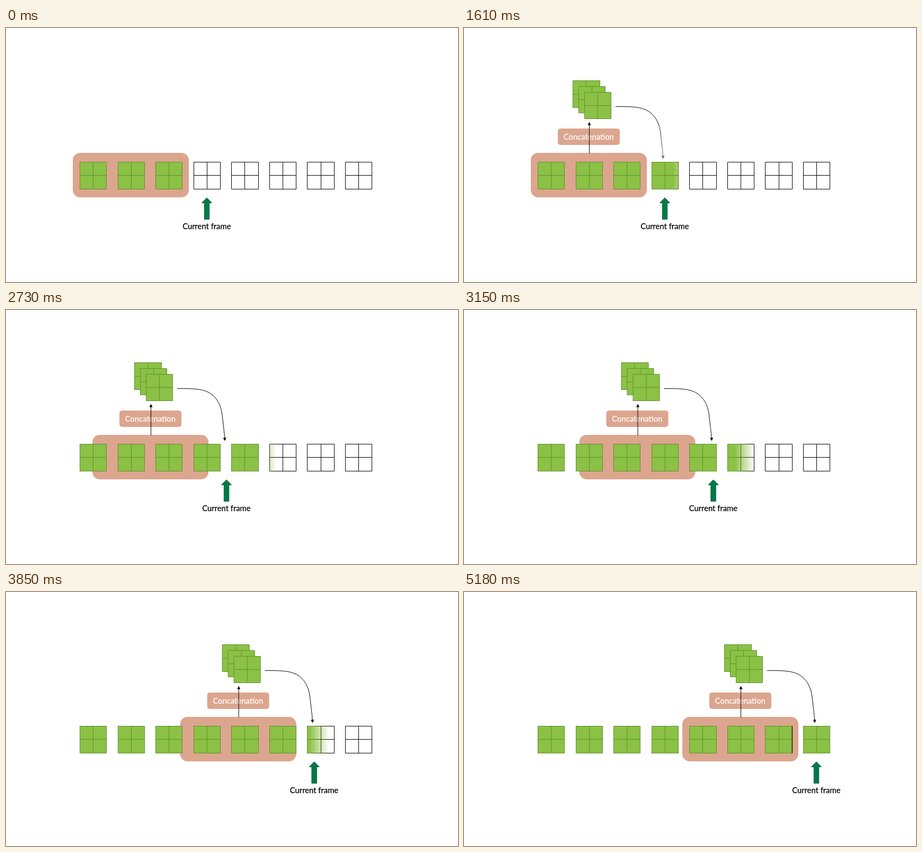
Recreate the animation shown at these times as an HTML page. Size 853x480 px, loop 5250 ms.

```html
<!DOCTYPE html>
<html lang="en">
<head>
<meta charset="utf-8">
<title>Sliding window</title>
<style>
  html, body { margin: 0; width: 100%; height: 100%; overflow: hidden; background: #fff; }
  svg { display: block; width: 100%; height: 100%; }
  text { font: 14.8px Lato, sans-serif; text-anchor: middle; stroke-width: .25; }
  .salmon { fill: #dca58e; }
  .line { fill: none; stroke: #000; }
  .empty { fill: #fff; stroke: #000; }
  .green { fill: #8bc145; stroke: #5f8f30; }
</style>
</head>
<body>
<svg viewBox="0 0 853 480">
  <defs id="defs"></defs>
  <g id="moving">
    <rect class="salmon" x="126" y="236" width="219" height="84" rx="14"/>
    <g id="concat">
      <rect class="salmon" x="177" y="190" width="117" height="31" rx="5"/>
      <text x="235.3" y="211" fill="#fff" stroke="#fff">Concatenation</text>
      <path class="line" d="M236.5 237V182"/>
      <path d="M236.5 177.5l3 6h-6z"/>
    </g>
    <g id="stack"></g>
    <g id="curve">
      <path class="line" d="M286 148.5C316 148.5 331 148.5 346 156C360 164 369 179 371 199C373 217 375 232 375.6 242"/>
      <path d="M376 247.5l-3.4-5.8 6-.4z"/>
    </g>
    <path d="M379 320.8L388.5 330.5H383.7V361.5H374.3V330.5H369.5Z" fill="#007a47" stroke="#00623a"/>
    <text x="378.8" y="380" stroke="#000">Current frame</text>
  </g>
  <g id="row"></g>
</svg>
<script>
const LOOP = 5250, STEP = 70, TRAVEL = 286;
const NS = 'http://www.w3.org/2000/svg';
const $ = id => document.getElementById(id);
const clamp = v => Math.min(1, Math.max(0, v));
const progress = (t, start, end) => clamp((t - start) / (end - start));
const smoother = u => u * u * u * (10 + u * (6 * u - 15));

function add(parent, tag, attrs) {
  const el = parent.appendChild(document.createElementNS(NS, tag));
  for (const key in attrs) el.setAttribute(key, attrs[key]);
  return el;
}

// Square with a cross; edges are pixel columns and rows, right and bottom exclusive.
function grid(parent, cls, left, top, right, bottom, midX, midY) {
  const l = left + .5, t = top + .5, r = right - .5, b = bottom - .5;
  return add(parent, 'path', {
    class: cls,
    d: `M${l} ${t}H${r}V${b}H${l}ZM${midX + .5} ${t}V${b}M${l} ${midY + .5}H${r}`
  });
}

// Soft-edged reveal along one axis, from coordinate `from` to `to`.
const wipes = [];
function wipe(el, axis, from, to, soft, start, end) {
  const id = 'wipe' + wipes.length;
  const gradient = add($('defs'), 'linearGradient', {
    id: id + 'g', gradientUnits: 'userSpaceOnUse', x1: 0, x2: 0, y1: 0, y2: 0
  });
  add(gradient, 'stop', { offset: 0, 'stop-color': '#fff' });
  add(gradient, 'stop', { offset: 1, 'stop-color': '#fff', 'stop-opacity': 0 });
  const area = { x: 0, y: 0, width: 853, height: 480 };
  const mask = add($('defs'), 'mask', { id, maskUnits: 'userSpaceOnUse', ...area });
  add(mask, 'rect', { ...area, fill: `url(#${id}g)` });
  const dir = Math.sign(to - from), reach = Math.abs(to - from) + soft;
  wipes.push(t => {
    const p = progress(t, start, end);
    el.style.display = p > 0 ? '' : 'none';
    if (p < 1) el.setAttribute('mask', `url(#${id})`);
    else el.removeAttribute('mask');
    const lead = from + dir * reach * p;
    gradient.setAttribute(axis + 1, lead - dir * soft);
    gradient.setAttribute(axis + 2, lead);
  });
}

for (let i = 0; i < 3; i++) {
  const x = 205 + 11 * i, y = 99 + 11 * i;
  const extra = i ? 0 : 1;
  grid($('stack'), 'green', x, y, x + 51 + extra, y + 51 + extra, x + 25, y + 25 + extra);
}

for (let i = 0; i < 8; i++) {
  const x = 139 + 71.57 * i;
  const left = Math.round(x), right = Math.round(x + 51.3), mid = Math.floor(x + 25.6);
  if (i > 2) grid($('row'), 'empty', left, 253, right, 305, mid, 278);
  const fill = grid($('row'), 'green', left, 253, i === 6 ? right - 1 : right, 305, mid, 278);
  if (i === 3) wipe(fill, 'x', left, right, 37, 1150, 1670);
  if (i > 3) {
    const start = 1777 + 810 * (i - 4);
    wipe(fill, 'x', left, right, 37, start, start + 973);
  }
}

wipe($('concat'), 'y', 238, 177, 10, 0, 510);
wipe($('stack'), 'y', 172, 99, 11, 575, 1105);
wipe($('curve'), 'x', 286, 380, 20, 1150, 1670);

function draw(t) {
  const shift = TRAVEL * smoother(progress(t, 1835, 5110));
  $('moving').setAttribute('transform', `translate(${shift.toFixed(2)} 0)`);
  wipes.forEach(update => update(t));
}

const origin = performance.now();
function tick() {
  const t = (performance.now() - origin) % LOOP;
  draw(Math.floor(t / STEP) * STEP);
  requestAnimationFrame(tick);
}
draw(0);
requestAnimationFrame(tick);
</script>
</body>
</html>
```
